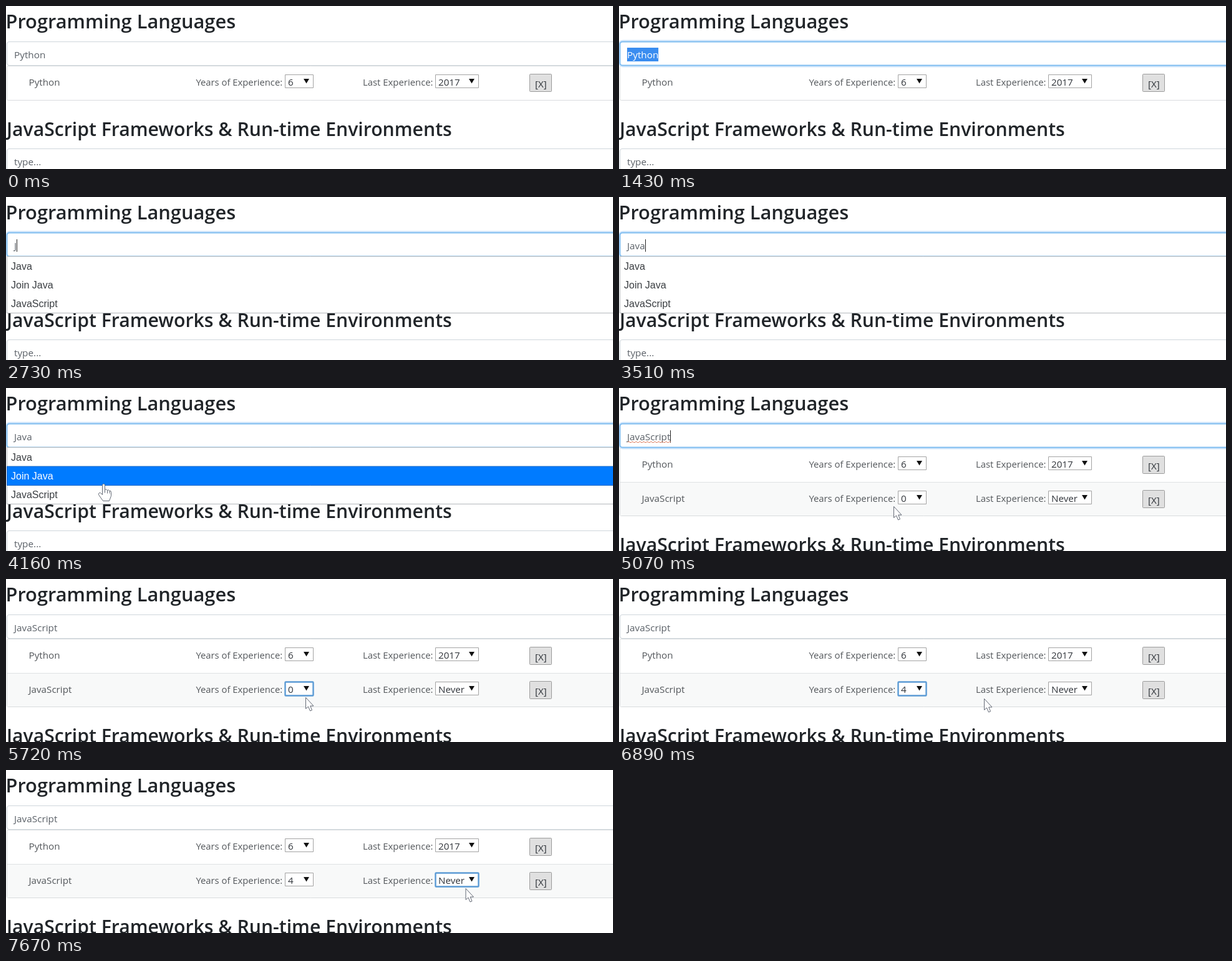
These frames come from a looping animation (973 by 262 pixels, 8 s). An HTML page with a canvas:

```html
<!DOCTYPE html>
<html lang="en">
<head>
<meta charset="utf-8">
<title>Skill picker</title>
<style>
  html, body { margin: 0; width: 100%; height: 100%; overflow: hidden; background: #fff; }
  canvas { display: block; }
</style>
</head>
<body>
<canvas id="stage" width="973" height="262"></canvas>
<script>
const LOOP = 8000, STEP = 130;
const UI = '"Open Sans", "Noto Sans", sans-serif';
const LIST = '16px "Liberation Sans", Arial, sans-serif';
const INK = '#30343a';
const ctx = document.getElementById('stage').getContext('2d');

// Pointer path: [time, x, y]
const path = [
  [3640, 72, 104], [4160, 156, 154], [4290, 160, 168], [4550, 166, 173],
  [5070, 440, 190], [5330, 474, 189], [5720, 480, 190], [6760, 480, 190],
  [7020, 690, 194], [7410, 730, 190], [7670, 736.5, 190]
];
// Field contents: [time, value]
const typed = [[0, 'Python'], [2340, ''], [2730, 'J'], [2860, 'Ja'], [3120, 'Jav'],
  [3510, 'Java'], [4420, 'JavaScript']];

function text(s, x, y, size = 15.2, color = '#53575b', weight = 400) {
  ctx.font = `${weight} ${size}px ${UI}`;
  ctx.fillStyle = color;
  ctx.fillText(s, x, y);
}

function rect(x, y, w, h, color) {
  ctx.fillStyle = color;
  ctx.fillRect(x, y, w, h);
}

function box(x, y, w, h, stroke, fill = '#fff', radius = 0, line = 1) {
  ctx.beginPath();
  ctx.roundRect(x + .5, y + .5, w, h, radius);
  ctx.fillStyle = fill;
  ctx.fill();
  ctx.lineWidth = line;
  ctx.strokeStyle = stroke;
  ctx.stroke();
}

const heading = (s, x, y, size) => text(s, x, y, size, '#212529', 600);

function select(value, x, y, w, focused) {
  if (focused) box(x, y, w, 22, '#5b9bd5', '#fff', 1, 2.4);
  else box(x, y, w, 21, '#a3a3a3');
  text(value, x + 5, y + 18, 15.2, INK);
  ctx.fillStyle = '#111';
  ctx.beginPath();
  ctx.moveTo(x + w - 15, y + 7);
  ctx.lineTo(x + w - 6, y + 7);
  ctx.lineTo(x + w - 10.5, y + 14.5);
  ctx.fill();
}

function row(name, y, years, last, focus) {
  text(name, 36.5, y + 32);
  text('Years of Experience:', 304.5, y + 32, 14.8);
  select(years, 447, y + 14, 45, focus === 'years');
  text('Last Experience:', 572, y + 32, 14.9);
  select(last, 688, y + 14, 69, focus === 'last');
  box(839, y + 13, 35, 28, '#9b9b9b', '#e0e0e0', 1);
  text('[X]', 848, y + 34.5, 15.2, INK);
}

function field(value, y, focused) {
  if (focused) box(1, y, 990, 38, '#d3e7fc', '#fff', 5, 6);
  box(1, y, 990, 38, focused ? '#80bdf0' : '#cfd6dc', '#fff', 4, focused ? 2 : 1.2);
  text(value, 13, y + 27, 15.3, '#5a6067');
}

function list(hover) {
  box(1, 95, 990, 91, '#b4b8bc');
  if (hover >= 0) box(1, 95 + hover * 30.5, 990, 30.5, '#1467c4', '#007bff');
  ctx.font = LIST;
  ['Java', 'Join Java', 'JavaScript'].forEach((item, i) => {
    ctx.fillStyle = i === hover ? '#fff' : '#3a3e42';
    ctx.fillText(item, 8, 117 + i * 30);
  });
}

const shapes = {
  arrow: new Path2D('M0 0V18L4 14.5L7 21.5L10 20.3L7.2 13.5H12.5Z'),
  hand: new Path2D('M-2 1Q0-2 2 1V9Q4 7 6 10Q8 8 9.5 11Q12 10 12 13V19L9 27H-1L-8 17Q-8 13-5 14L-2 17Z')
};

function pointer(t) {
  const i = path.findLastIndex(p => p[0] <= t);
  if (i < 0) return null;
  const a = path[i], b = path[i + 1] || a;
  const k = b === a ? 0 : (t - a[0]) / (b[0] - a[0]);
  return [a[1] + (b[1] - a[1]) * k, a[2] + (b[2] - a[2]) * k];
}

function drawPointer([x, y], kind) {
  ctx.save();
  ctx.translate(x + .5, y + .5);
  ctx.fillStyle = '#fff';
  ctx.fill(shapes[kind]);
  ctx.lineWidth = 1;
  ctx.strokeStyle = '#626874';
  ctx.stroke(shapes[kind]);
  if (kind === 'hand') ctx.stroke(new Path2D('M2 9V14M6 10V15M9.5 11V15'));
  ctx.restore();
}

// Selection grows leftwards from the end of the word
function selection(value, end, k) {
  const start = end - (end - 13) * k;
  ctx.save();
  ctx.beginPath();
  ctx.rect(start, 67, end - start, 22);
  ctx.clip();
  rect(start, 67, end - start, 22, '#3a8df0');
  text(value, 13, 84, 15.3, '#fff');
  ctx.restore();
}

function draw(ms) {
  const t = Math.floor(ms / STEP) * STEP;
  const open = t >= 2730 && t < 4420;
  const added = t >= 4420;
  const focused = t >= 780 && t < 5460;
  const value = typed.findLast(p => p[0] <= t)[1];
  const shift = added ? 54 : 0;
  const at = pointer(t);

  rect(0, 0, 973, 262, '#fff');
  heading('Programming Languages', -.5, 36, 30.8);
  heading('JavaScript Frameworks & Run-time Environments', 1, 208.5 + shift, 30.2);
  field('type...', 229 + shift, false);

  box(1, 96, 990, 55 + shift, '#d9dcde', '#fff', 2);
  if (added) {
    rect(2, 152, 971, 53, '#f8f9f9');
    rect(2, 151, 971, 1, '#dfe1e3');
  }
  row('Python', 96, '6', '2017');
  if (added) {
    const focus = t >= 7410 ? 'last' : t >= 5460 ? 'years' : '';
    row('JavaScript', 151, t >= 6760 ? '4' : '0', 'Never', focus);
  }

  field(value, 57, focused);
  const end = 13 + ctx.measureText(value).width;
  if (t >= 1040 && t < 2340) {
    selection(value, end, Math.min(1, (t - 910) / 520));
  } else if (focused && (t < 3640 || added)) {
    rect(Math.round(end), 68, 1, 20, '#222');
  }
  if (added && focused) {
    for (let x = 14; x < end; x += 3) rect(x, 86 + x % 2, 3, 1, '#dd8266');
  }

  if (open) list(at ? Math.min(2, Math.floor((at[1] - 96) / 30.3)) : -1);
  if (at) drawPointer(at, open ? 'hand' : 'arrow');
}

const begin = performance.now();
function frame() {
  draw((performance.now() - begin) % LOOP);
  requestAnimationFrame(frame);
}
frame();
</script>
</body>
</html>
```
